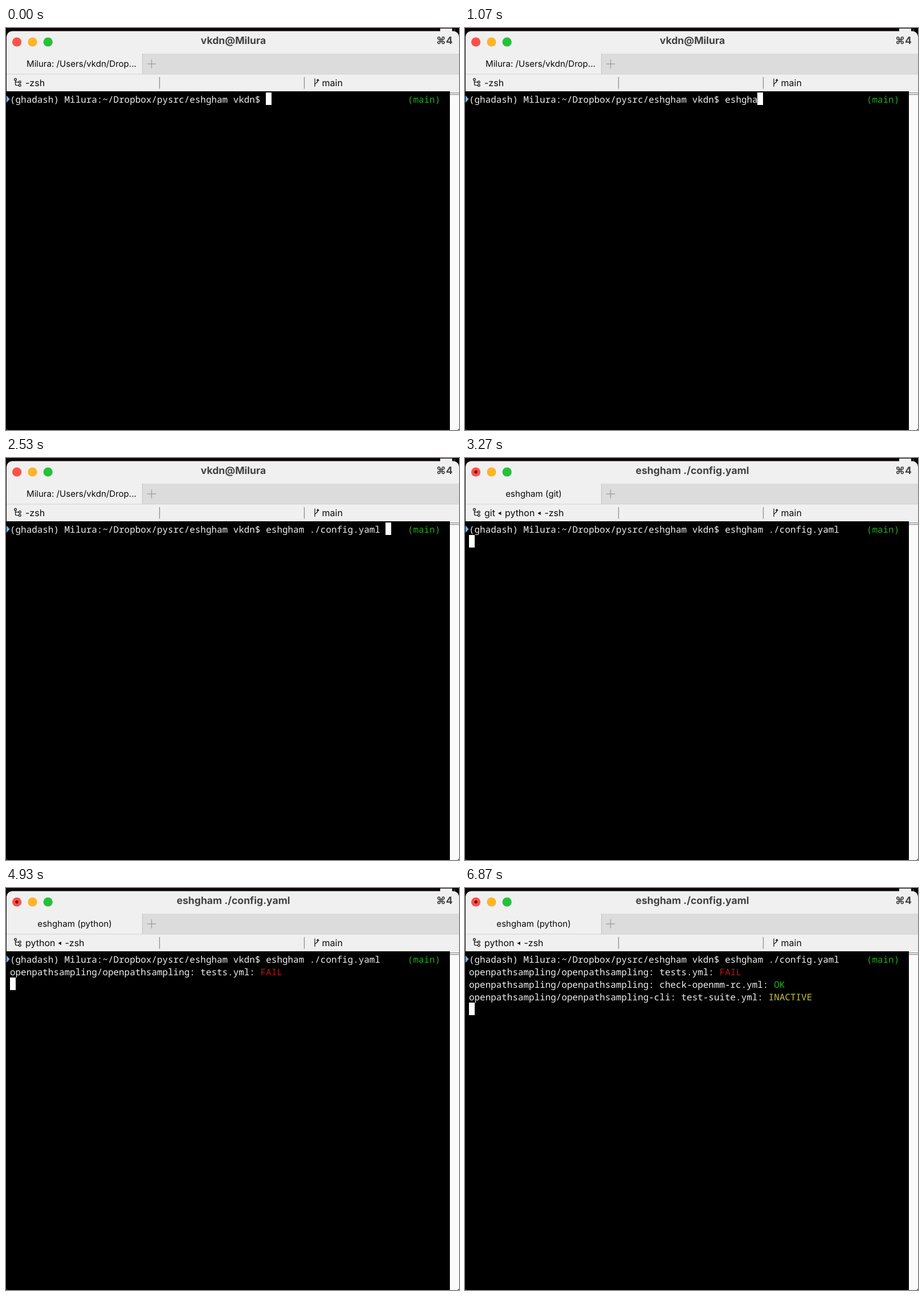
An HTML page for the animation above (8 s loop, 795 by 705 pixels).

```html
<!DOCTYPE html>
<html lang="en">
<head>
<meta charset="utf-8">
<title>Terminal session</title>
<style>
  html, body { margin: 0; width: 100%; height: 100%; overflow: hidden; background: #000; }
  svg { display: block; width: 795px; height: 705px; }
  text {
    font-family: Inter, "Noto Sans", "DejaVu Sans", sans-serif;
    text-rendering: geometricPrecision;
    white-space: pre;
    fill: #080808;
  }
  .title { font-size: 17.6px; font-weight: 700; fill: #424242; }
  .tab { font-size: 15.1px; }
  .status { font-size: 16px; }
  .term text {
    font-family: "Noto Sans Mono", "DejaVu Sans Mono", monospace;
    font-size: 15.933px;
    font-variant-ligatures: none;
    fill: #f0f0f0;
  }
  .term .green { fill: #27a826; }
  .term .ok { fill: #14b518; }
  .term .red { fill: #b5190f; }
  .term .yellow { fill: #c9c236; }
  .icon { fill: none; stroke: #111; stroke-width: 1.2; }
</style>
</head>
<body>
<svg viewBox="0 0 795 705">
  <rect width="795" height="705" fill="#0b0708"/>
  <path d="M762 1H783V6H762Z" fill="#f2f2f2"/>
  <path d="M787 2V6" stroke="#777"/>

  <!-- window chrome -->
  <path d="M1 111V15A10 10 0 0 1 11 5.5H785A10 10 0 0 1 795 15V111Z" fill="#f1f0f1"/>
  <rect x="239" y="45" width="556" height="36" fill="#dcdcdc"/>
  <path d="M239.5 45V81" stroke="#c3c3c3"/>
  <path d="M1 80.9H795" stroke="#d2d2d2"/>
  <circle cx="19" cy="24.5" r="8.1" fill="#fe5149"/>
  <circle cx="46.5" cy="24.5" r="8.1" fill="#fdb528"/>
  <circle cx="73.7" cy="24.5" r="8.1" fill="#25c138"/>
  <circle id="busy" cx="19" cy="24.5" r="2.7" fill="#6e0502"/>
  <text id="title" class="title" x="399" y="28" text-anchor="middle"></text>
  <text class="title" x="784" y="28" text-anchor="end">⌘4</text>
  <text id="tab" class="tab" y="68.3"></text>
  <path d="M247.8 63H263.2M255.5 55.3V70.7" stroke="#a2a2a2" stroke-width="1.4"/>

  <!-- status bar -->
  <path d="M269.5 86V106.5M523.5 86V106.5" stroke="#8b8b8b" stroke-width="1.3"/>
  <g class="icon">
    <circle cx="16.5" cy="90.3" r="1.9"/>
    <circle cx="24.3" cy="94.8" r="1.9"/>
    <circle cx="24.3" cy="100.5" r="1.9"/>
    <path d="M16.5 92.2V98.5Q16.5 100.5 18.5 100.5H22.4M16.5 94.8H22.4"/>
    <path d="M542 88.5V103M542 99.5C542 95.5 547.3 97.5 547.3 92"/>
    <path d="M544.5 92.5L547.3 89L550 92.5Z" fill="#111" stroke="none"/>
  </g>
  <g id="jobs"></g>
  <text class="status" x="554.5" y="101.6">main</text>

  <!-- terminal -->
  <rect x="1" y="111" width="778" height="594" fill="#000"/>
  <rect x="779" y="111" width="16" height="594" fill="#fafafa"/>
  <path d="M779 113.7H795M779 116.7H795" stroke="#8a8a8a" stroke-width="1.2"/>
  <path d="M1 702Q1.5 704.5 4 705H1ZM795 702Q794.5 704.5 792 705H795Z" fill="#3a3a3a"/>
  <path d="M1 118.5L6.5 124.8L1 131Z" fill="#74b9f4"/>
  <g class="term" id="term">
    <rect id="cursor" width="10" height="22" fill="#fff"/>
  </g>
</svg>

<script>
const LOOP = 8000, CELL = 9.56, ROW = 22, LEFT = 7;
const HOST = 'Milura', USER = 'vkdn';
const PROMPT = `(ghadash) ${HOST}:~/Dropbox/pysrc/eshgham ${USER}$ `;
const COMMAND = 'eshgham ./config.yaml ';
const ENTER = 2930;

// [time, number of typed characters]
const typing = [
  [0, 0], [330, 1], [470, 2], [600, 3], [800, 4], [870, 5], [1070, 6], [1200, 7],
  [1530, 8], [2130, 9], [2200, 10], [2330, 11], [2400, 12], [2530, 22]
];
// [time, foreground job, process chain]
const jobStates = [
  [0, '', ['-zsh']],
  [ENTER, '-zsh', ['-zsh']],
  [3200, 'python', ['python', '-zsh']],
  [3270, 'git', ['git', 'python', '-zsh']],
  [3930, 'python', ['python', '-zsh']]
];
// [time, text, result, colour]
const output = [
  [4870, 'openpathsampling/openpathsampling: tests.yml: ', 'FAIL', 'red'],
  [6130, 'openpathsampling/openpathsampling: check-openmm-rc.yml: ', 'OK', 'ok'],
  [6870, 'openpathsampling/openpathsampling-cli: test-suite.yml: ', 'INACTIVE', 'yellow']
];

const $ = id => document.getElementById(id);
const at = (steps, t) => steps.filter(s => s[0] <= t).pop();

function add(parent, tag, attrs, text = '') {
  const el = document.createElementNS('http://www.w3.org/2000/svg', tag);
  for (const key in attrs) el.setAttribute(key, attrs[key]);
  el.textContent = text;
  return parent.appendChild(el);
}

const print = (col, row, text, colour = '') =>
  add($('term'), 'text', { x: LEFT + col * CELL, y: 131.4 + row * ROW, class: colour }, text);

print(0, 0, PROMPT);
print(73, 0, '(main)', 'green');
const typed = print(PROMPT.length, 0, '');
const lines = output.map(([, text, result, colour], i) =>
  [print(0, i + 1, text), print(text.length, i + 1, result, colour)]);

function showJobs(job, chain) {
  $('busy').style.display = job ? '' : 'none';
  $('title').textContent = job ? COMMAND.trim() : `${USER}@${HOST}`;
  const tab = $('tab');
  tab.textContent = job ? `eshgham (${job})` : `${HOST}: /Users/${USER}/Drop...`;
  tab.setAttribute('x', job ? 120.5 : 36);
  tab.setAttribute('text-anchor', job ? 'middle' : 'start');

  const box = $('jobs');
  box.replaceChildren();
  let x = 34;
  chain.forEach((name, i) => {
    if (i) {
      add(box, 'path', { d: `M${x + 5} 97l5.5 -3v6Z`, fill: '#111' });
      x += 17;
    }
    const el = add(box, 'text', { class: 'status', x, y: 101.6 }, name);
    x += el.getComputedTextLength();
  });
}

let shown;
function draw(now) {
  const t = now % LOOP;
  const count = at(typing, t)[1];
  const state = at(jobStates, t);
  const done = output.filter(o => o[0] <= t).length;

  typed.textContent = COMMAND.slice(0, count);
  lines.forEach((parts, i) => parts.forEach(p => p.style.display = i < done ? '' : 'none'));
  const col = t < ENTER ? PROMPT.length + count : 0;
  const row = t < ENTER ? 0 : done + 1;
  $('cursor').setAttribute('x', Math.floor(LEFT + col * CELL));
  $('cursor').setAttribute('y', 113 + row * ROW);

  if (state !== shown) {
    shown = state;
    showJobs(state[1], state[2]);
  }
  requestAnimationFrame(draw);
}
draw(0);
</script>
</body>
</html>
```
